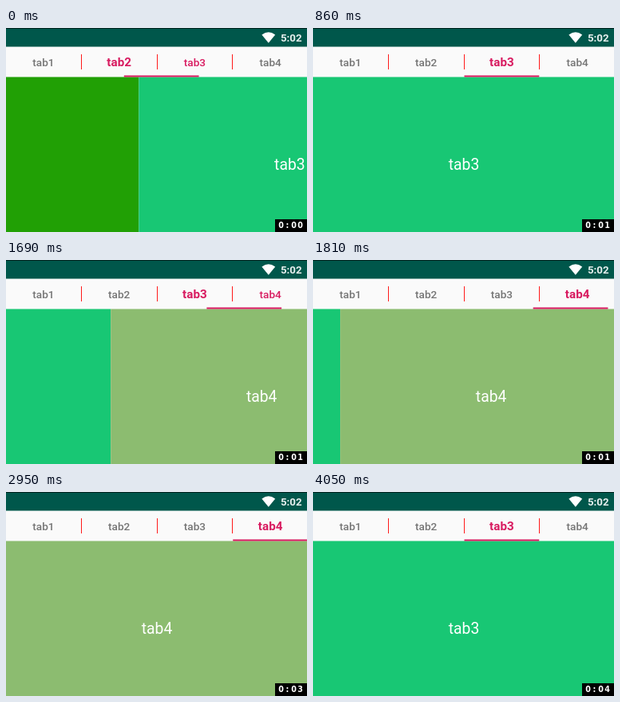
Recreate the animation shown at these times as an HTML page with a canvas. Size 377 px wide and 256 px high, loop 4480 ms.

```html
<!DOCTYPE html>
<html lang="en">
<head>
<meta charset="utf-8">
<title>Tabs</title>
<style>
html, body { margin: 0; width: 100%; height: 100%; overflow: hidden; background: #fafafa; }
canvas { display: block; }
</style>
</head>
<body>
<canvas id="stage" width="377" height="256"></canvas>
<script>
// the screen is one pixel wider than the stage
const W = 378, H = 256, LOOP = 4480, TICK = 130;
const BAR = 23.5, PAGE_TOP = 61.5;
const TAB = (W - 3) / 4, STEP = TAB + 1;
const PINK = '#d81b60';
const PAGES = ['#1a9c00', '#21a005', '#18c774', '#8cbc70'];
const ctx = document.getElementById('stage').getContext('2d');

// a finger drags from grab to reach in some ticks, then
// each further tick keeps a share of the remaining way
const SWIPES = [
  { at: 0, from: 1, to: 2, grab: 0, reach: 0.56, drag: 0, keep: 0.15 },
  { at: 1420, from: 2, to: 3, grab: 0.023, reach: 0.653, drag: 2, keep: 0.26 },
  { at: 3630, from: 3, to: 2, grab: 0, reach: 0.38, drag: 0, keep: 0.2 }
];

function pager(t) {
  const s = SWIPES.filter(s => s.at <= t).pop();
  const n = Math.floor((t - s.at) / TICK);
  const settling = n > s.drag;
  let done = s.reach;
  if (settling) {
    const gap = (1 - s.reach) * s.keep ** (n - s.drag);
    done = gap < 0.007 ? 1 : 1 - gap;
  } else if (s.drag) {
    done = s.grab + (s.reach - s.grab) * n / s.drag;
  }
  return { pos: s.from + (s.to - s.from) * done, selected: settling ? s.to : s.from };
}

function rect(color, x, y, w, h) {
  ctx.fillStyle = color;
  ctx.fillRect(x, y, w, h);
}

function text(str, x, y, font, color, family = 'Roboto') {
  ctx.font = `${font} ${family}, "Noto Sans", sans-serif`;
  ctx.textAlign = 'center';
  ctx.fillStyle = color;
  ctx.fillText(str, x, y);
}

function statusBar() {
  rect('#00574b', 0, 0, W, BAR);
  rect('#00221d', 0, 0, W, 1);
  ctx.fillStyle = '#fff';
  ctx.beginPath();
  ctx.moveTo(328.8, 18.8);
  ctx.lineTo(320.4, 8.4);
  ctx.quadraticCurveTo(328.8, 2.2, 337.2, 8.4);
  ctx.fill();
  text('5:02', 357.3, 17, 'bold 13.3px', '#e8f0ef');
}

function tabs(pos, selected) {
  for (let i = 0; i < 4; i++) {
    const bold = i === selected;
    const lit = bold || i === Math.round(pos);
    text('tab' + (i + 1), i * STEP + TAB / 2, 48, bold ? 'bold 15.2px' : '500 13.6px', lit ? PINK : '#757575');
    if (i) rect('#ff1a1a', Math.round(i * STEP - 1), 33, 1, 19);
  }
  rect(PINK, pos * STEP, PAGE_TOP - 2, TAB, 2);
}

function pages(pos) {
  for (let i = Math.floor(pos); i <= Math.ceil(pos); i++) {
    const x = (i - pos) * W;
    rect(PAGES[i], x, PAGE_TOP, W, H - PAGE_TOP);
    text('tab' + (i + 1), x + W / 2, 178, '19.3px', '#fff');
  }
}

function clock(t) {
  rect('#000', 337, 240, 40, 16);
  const label = '0:0' + Math.floor((t + 140) / 1000);
  [...label].forEach((ch, i) => text(ch, 344.5 + i * 8, 251, 'bold 9.6px', '#fff', '"DejaVu Sans"'));
}

function draw(now) {
  const t = now % LOOP;
  const { pos, selected } = pager(t);
  rect('#fafafa', 0, 0, W, H);
  pages(pos);
  tabs(pos, selected);
  statusBar();
  clock(t);
}

const start = performance.now();
function tick() {
  draw(performance.now() - start);
  requestAnimationFrame(tick);
}
tick();
</script>
</body>
</html>
```
